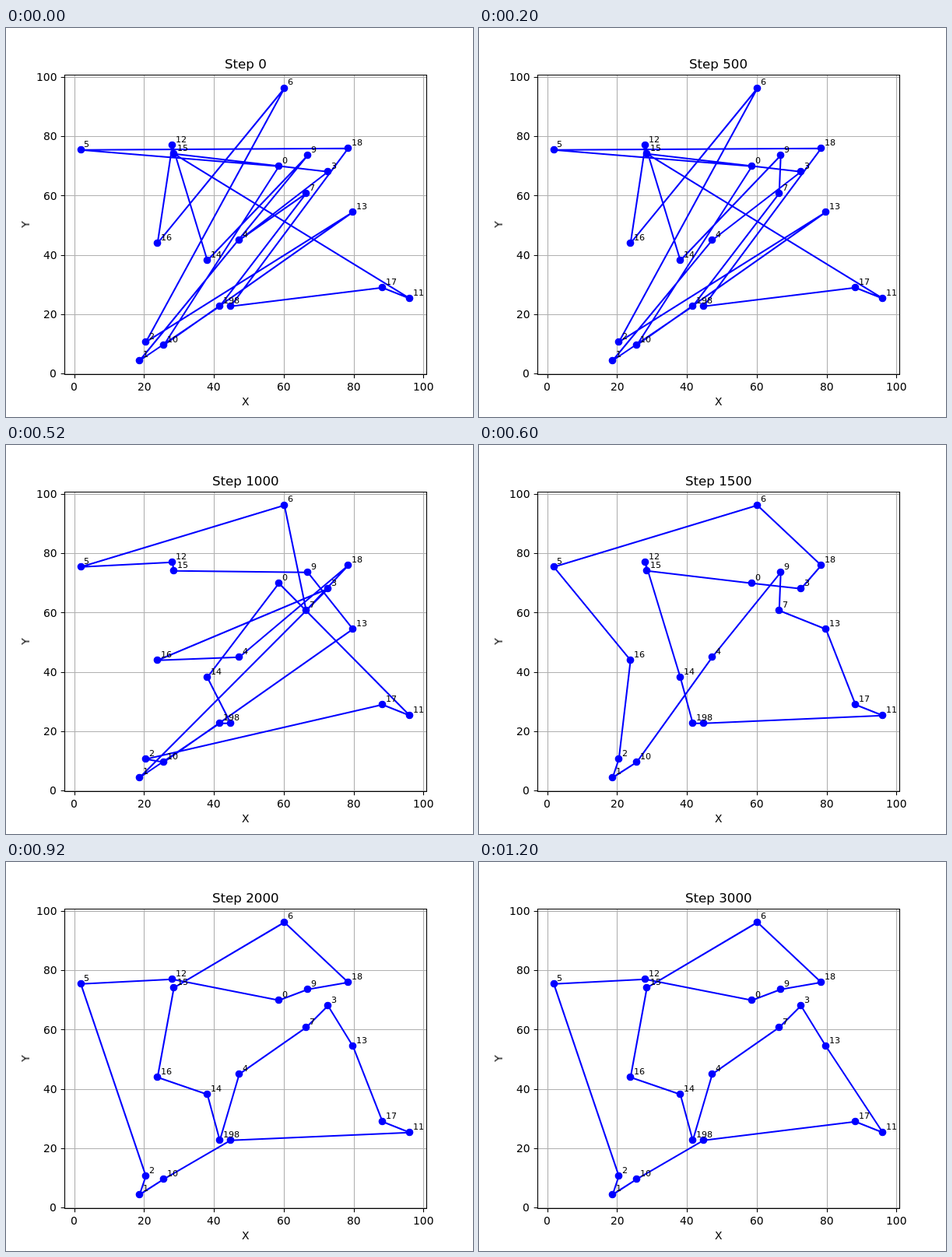
Write an HTML page that moves like this. It is 600 by 500 pixels and loops after 1.4 s.

```html
<!DOCTYPE html>
<html lang="en">
<head>
<meta charset="utf-8">
<title>Tour optimisation</title>
<style>
  html, body { margin: 0; width: 100%; height: 100%; overflow: hidden; background: #fff; }
  svg { display: block; width: 600px; height: 500px; overflow: hidden; }
  text { font: 13.89px "DejaVu Sans", sans-serif; fill: #000; }
  .title { font-size: 16.67px; }
  .tag { font-size: 11.11px; }
  .grid { stroke: #b0b0b0; stroke-width: 1.11; }
  .axis { stroke: #000; stroke-width: 1.11; fill: none; }
  .tour { stroke: #00f; stroke-width: 2.08; stroke-linejoin: round; fill: none; }
  .city { fill: #00f; }
  /* the tours sit side by side, one stage width apart */
  #strip { animation: slide 1400ms steps(7, end) infinite; }
  @keyframes slide { to { transform: translateX(-4200px); } }
</style>
</head>
<body>
<svg id="plot" viewBox="0 0 600 500"></svg>
<script>
const svg = document.getElementById("plot");
const START = 0, MIDDLE = 0.5, END = 1;

const cities = [
  [351, 178], [172, 427.8], [180, 404], [414, 185], [300, 273],
  [96.4, 157], [358, 77.8], [386, 213], [289, 358], [388, 164],
  [203, 408], [519.1, 348], [214, 151], [446, 237], [259, 299],
  [216, 162], [195, 277], [484, 334], [440, 155], [275, 358]
].map(([x, y]) => [x - 0.3, y - 0.3]);

const order = text => text.split(" ").map(Number);

// 2-opt move: reverse the stretch between two cities
function flip(tour, from, to) {
  const a = tour.indexOf(from), b = tour.indexOf(to) + 1;
  return [...tour.slice(0, a), ...tour.slice(a, b).reverse(), ...tour.slice(b)];
}

const first = order("13 2 6 16 12 14 9 1 19 7 4 3 15 11 17 8 18 5 0 10");
const rough = order("13 9 15 12 5 6 7 18 4 16 3 1 19 8 14 0 11 17 2 10");
const better = order("5 6 18 3 0 15 12 14 19 8 11 17 13 7 9 4 10 1 2 16");
const good = order("5 12 0 9 18 6 15 16 14 19 4 7 3 13 17 11 8 10 1 2");
const best = flip(good, 17, 11);
const tours = [first, flip(first, 1, 7), rough, better, good, best, best];

function add(parent, tag, attrs, text = "") {
  const el = document.createElementNS("http://www.w3.org/2000/svg", tag);
  for (const key in attrs) el.setAttribute(key, attrs[key]);
  el.textContent = text;
  return parent.appendChild(el);
}

const path = (cls, d) => add(svg, "path", { class: cls, d });
const snap = v => Math.round(v) + 0.5;

// text starts on a whole pixel
function label(cls, x, y, text, align = START, parent = svg) {
  const el = add(parent, "text", { class: cls, y: Math.round(y) }, text);
  el.setAttribute("x", Math.round(x - align * el.getComputedTextLength()));
}

for (let i = 0; i <= 5; i++) {
  const x = 87.75 + 89.72 * i, y = 444.2 - 76.25 * i;
  path("grid", `M${snap(x)} 60.5V445.5M75.5 ${snap(y)}H540.5`);
  path("axis", `M${snap(x)} 445.5v4.86M75.5 ${snap(y)}h-4.86`);
  label("tick", x, 466, i * 20, MIDDLE);
  label("tick", 65.3, y + 5.07, i * 20, END);
}

const strip = add(svg, "g", { id: "strip" });
tours.forEach((tour, i) => {
  const step = add(strip, "g", { transform: `translate(${i * 600})` });
  const points = tour.map(n => cities[n]).join(" ");
  add(step, "polygon", { class: "tour", points });
  label("title", 307.5, 52, `Step ${i * 500}`, MIDDLE, step);
});

for (const [x, y] of cities) {
  add(svg, "circle", { class: "city", cx: Math.floor(x) + 0.5, cy: Math.floor(y) + 0.5, r: 4.86 });
}
path("axis", "M75.5 60.5H540.5V445.5H75.5Z");
cities.forEach(([x, y], i) => label("tag", x + 4.17, y - 4.17, i));

label("name", 307.5, 485, "X", MIDDLE);
add(svg, "text", { "text-anchor": "middle", transform: "translate(30 252.5) rotate(-90)" }, "Y");
</script>
</body>
</html>
```
